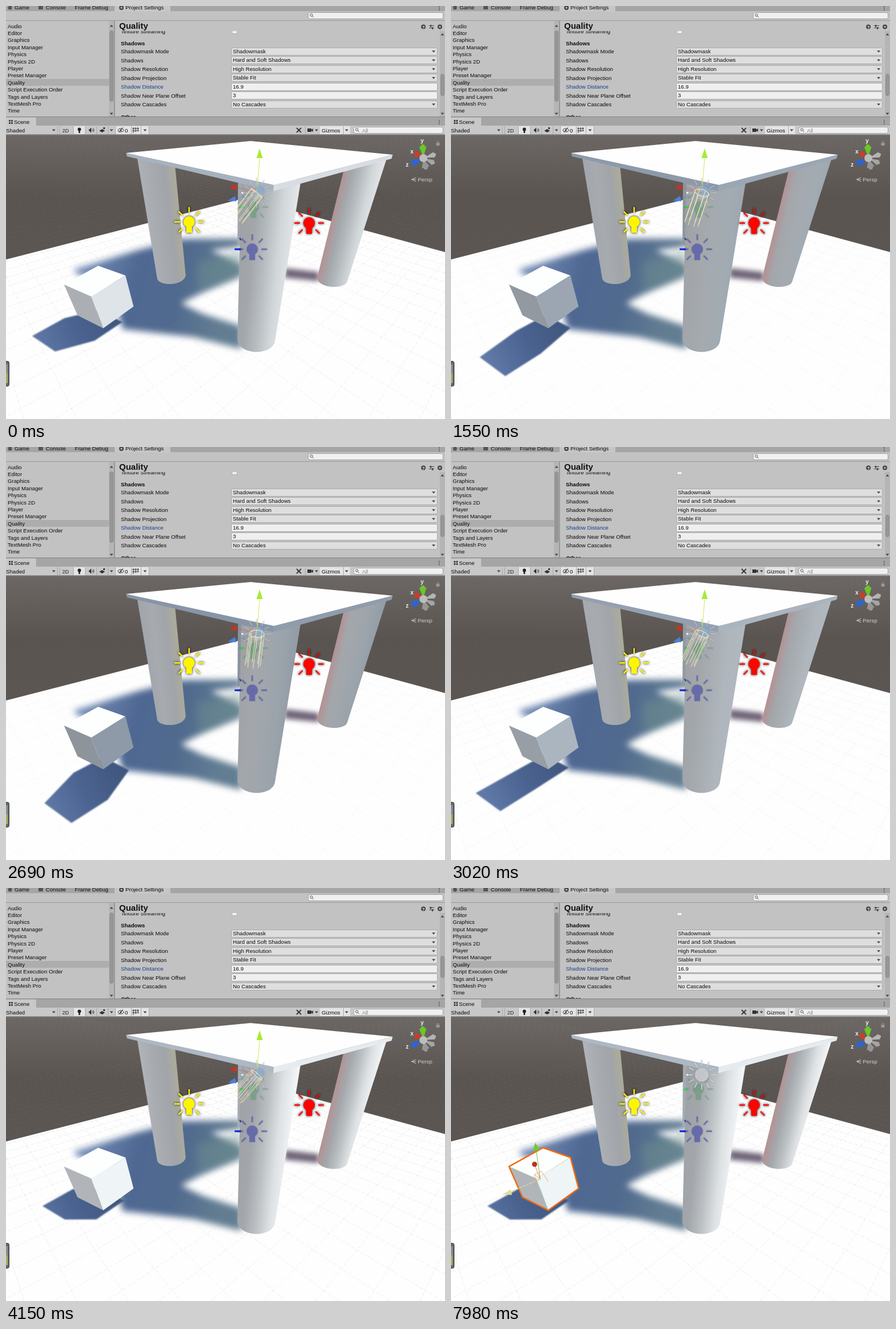
These frames come from a looping animation (772 by 725 pixels, 8000 ms). An HTML page with a canvas:

```html
<!DOCTYPE html>
<html lang="en">
<head>
<meta charset="utf-8">
<title>Shadow distance</title>
<style>
html, body { margin: 0; width: 100%; height: 100%; overflow: hidden; background: #c2c2c2; }
canvas { display: block; }
</style>
</head>
<body>
<canvas id="stage" width="772" height="725"></canvas>
<script>
const ctx = document.getElementById('stage').getContext('2d');
const LOOP = 8000;

// Camera space: x right, y down, z forward
const FOCAL = 481, CENTER = [386, 475];
const RIGHT = [1, 0, 0], DOWN = [0, .856, .517], FORWARD = [0, -.517, .856];
const FLOOR_DEPTH = 385, LIGHT_POS = [55, -147, FOCAL];

const dot = (a, b) => a[0] * b[0] + a[1] * b[1] + a[2] * b[2];
const add = (a, b, k = 1) => a.map((v, i) => v + k * b[i]);
const cross = (a, b) => [a[1] * b[2] - a[2] * b[1], a[2] * b[0] - a[0] * b[2], a[0] * b[1] - a[1] * b[0]];
const unit = a => a.map(v => v / Math.sqrt(dot(a, a)));
const project = ([x, y, z]) => [CENTER[0] + FOCAL * x / z, CENTER[1] + FOCAL * y / z];

// Cube corners: bits 1, 2 and 4 step right, left and down from the near top corner
const cubeEdges = [[43.7, -37.2, 44.6], [-69, -20, 35.6], [-.5, 64.8, 48.1]];
const corners = Array.from({ length: 8 }, (_, bits) => cubeEdges.reduce(
  (p, edge, i) => add(p, edge, bits >> i & 1), [-236, 35, FOCAL]));
const cubePoints = corners.map(project);

// The light turns about the vertical axis: [ms, degrees]
const turns = [[500, 18], [1140, 41.5], [1910, 79], [2240, 80.5], [2510, 80.5],
  [2690, 78], [3460, 12], [4150, -6.5]];

function lightAngle(t) {
  const next = turns.findIndex(([time]) => t < time);
  if (next < 0) return turns[turns.length - 1][1];
  if (next === 0) return turns[0][1];
  const [t0, a] = turns[next - 1], [t1, b] = turns[next];
  return a + (b - a) * (t - t0) / (t1 - t0);
}

function lightDirection(degrees) {
  const a = degrees * Math.PI / 180, slant = .8 + .0014 * degrees;
  return add(add(DOWN, RIGHT, -slant * Math.cos(a)), FORWARD, -slant * Math.sin(a));
}

function hull(points) {
  const sorted = [...points].sort((p, q) => p[0] - q[0] || p[1] - q[1]);
  const half = list => {
    const out = [];
    for (const p of list) {
      while (out.length > 1) {
        const [a, b] = out.slice(-2);
        if ((b[0] - a[0]) * (p[1] - a[1]) - (b[1] - a[1]) * (p[0] - a[0]) > 0) break;
        out.pop();
      }
      out.push(p);
    }
    return out.slice(0, -1);
  };
  return [...half(sorted), ...half(sorted.reverse())].flat();
}

const castShadow = light => hull(corners.map(p => project(add(p, light, FLOOR_DEPTH - dot(p, DOWN)))));

function mix(dark, bright, k) {
  const part = (hex, n) => parseInt(hex.substr(1 + 2 * n, 2), 16);
  return `rgb(${[0, 1, 2].map(n => Math.round(part(dark, n) + (part(bright, n) - part(dark, n)) * k))})`;
}

function gradient(x0, y0, x1, y1, ...colors) {
  const g = ctx.createLinearGradient(x0, y0, x1, y1);
  colors.forEach((c, i) => g.addColorStop(i / (colors.length - 1), c));
  return g;
}

function path(points, close = true) {
  ctx.beginPath();
  for (let i = 0; i < points.length; i += 2) ctx.lineTo(points[i], points[i + 1]);
  if (close) ctx.closePath();
}

function poly(points, fill, blur = 0) {
  path(points);
  if (blur) ctx.filter = `blur(${blur}px)`;
  ctx.fillStyle = fill;
  ctx.fill();
  ctx.filter = 'none';
}

function stroke(color, width = 1) {
  ctx.strokeStyle = color;
  ctx.lineWidth = width;
  ctx.stroke();
}

function line(points, color, width) {
  path(points, false);
  stroke(color, width);
}

function disc(x, y, r, fill) {
  ctx.beginPath();
  ctx.arc(x, y, r, 0, 7);
  ctx.fillStyle = fill;
  ctx.fill();
}

function ring(x, y, r, color, from = 0, to = 7) {
  ctx.beginPath();
  ctx.arc(x, y, r, from, to);
  stroke(color);
}

function cone(x, y, tipX, tipY, r, color) {
  const dx = tipX - x, dy = tipY - y, k = r / Math.hypot(dx, dy);
  poly([x - dy * k, y + dx * k, tipX, tipY, x + dy * k, y - dx * k], color);
}

function rect(x, y, w, h, fill) {
  ctx.fillStyle = fill;
  ctx.fillRect(x, y, w, h);
}

function box(x, y, w, h, fill, border, r = 2) {
  ctx.beginPath();
  ctx.roundRect(x + .5, y + .5, w - 1, h - 1, r);
  ctx.fillStyle = fill;
  ctx.fill();
  stroke(border);
}

function text(s, x, y, color = '#0b0b0b', size = 9.65, weight = '') {
  ctx.font = `${weight} ${size}px "Liberation Sans", Arial, sans-serif`;
  ctx.fillStyle = color;
  ctx.fillText(s, x, y);
}

const arrow = (x, y, up = 1) => cone(x, y - 1.5 * up, x, y + 2 * up, 3, '#444');

function searchField(x, y, w) {
  box(x, y, w, 12, '#f0f0f0', '#a0a0a0', 3);
  ring(x + 6, y + 5, 2.2, '#555');
  line([x + 7.6, y + 6.6, x + 10, y + 9], '#555');
}

function menuDots(y) {
  for (let i = -1; i < 2; i++) rect(761, y + i * 3, 1.5, 1.5, '#444');
}

function scrollbar(x, y, h, thumbY, thumbH) {
  rect(x, y, 9, h, '#b5b5b5');
  box(x + 1, thumbY, 7, thumbH, '#969696', '#8c8c8c', 3);
  arrow(x + 4.5, 189);
}

function gear(x, y) {
  disc(x, y, 4, '#444');
  disc(x, y, 1.6, '#c6c6c6');
}

function clipped(x, y, w, h, draw) {
  ctx.save();
  ctx.beginPath();
  ctx.rect(x, y, w, h);
  ctx.clip();
  draw();
  ctx.restore();
}

function settingsPanel(t) {
  rect(0, 0, 772, 226, '#c2c2c2');
  rect(0, 0, 772, 9, '#a5a5a5');
  rect(191, 0, 98, 10, '#c6c6c6');
  disc(7, 3, 3.5, '#555');
  text('Game', 15, 6);
  rect(57, 0, 8, 6, '#555');
  text('Console', 70, 6);
  text('Frame Debug', 121, 6);
  gear(203, 3);
  text('Project Settings', 210, 6);
  menuDots(3);
  rect(0, 25, 772, 1, '#999');
  searchField(531, 11, 238);

  clipped(0, 26, 181, 168, () => {
    rect(0, 128, 181, 12, '#adadad');
    'Audio,Editor,Graphics,Input Manager,Physics,Physics 2D,Player,Preset Manager,Quality,Script Execution Order,Tags and Layers,TextMesh Pro,Time,VFX'
      .split(',').forEach((s, i) => text(s, 3, 38.6 + i * 12.4));
  });
  scrollbar(181, 26, 168, 43, 125);
  arrow(185.5, 35, -1);
  rect(190, 26, 1.5, 168, '#8b8b8b');

  text('Quality', 199, 40, '#111', 15, 'bold');
  disc(734, 36.5, 4, '#444');
  text('?', 732, 39.5, '#fff', 7, 'bold');
  [34, 38].forEach((y, i) => {
    line([744, y + .5, 753, y + .5], '#444');
    rect(746 + 3 * i, y - 1, 2, 4, '#444');
  });
  gear(763, 36.5);

  clipped(192, 44, 572, 150, () => {
    text('Texture Streaming', 202, 47.5);
    box(397, 38, 10, 11, t >= 6120 && t < 6160 ? '#fff' : '#f0f0f0', '#aaa');
    text('Shadows', 202, 69, '#0b0b0b', 9.65, 'bold');
    [['Shadowmask Mode', 'Shadowmask'], ['Shadows', 'Hard and Soft Shadows'],
      ['Shadow Resolution', 'High Resolution'], ['Shadow Projection', 'Stable Fit'],
      ['Shadow Distance', '16.9'], ['Shadow Near Plane Offset', '3'],
      ['Shadow Cascades', 'No Cascades']].forEach(([label, value], i) => {
      const y = 79.7 + i * 15.5, input = i === 4 || i === 5;
      const hover = i === 5 && t >= 7340 && t < 7380;
      text(label, 202, y + 3.7, i === 4 ? '#16408c' : undefined);
      box(396, Math.round(y - 7), 363, 14, input ? '#efefef' : '#dedede', hover ? '#777' : '#aaa');
      text(value, 399, y + 3.2);
      if (!input) arrow(752, y);
    });
    text('Other', 202, 198, '#0b0b0b', 9.65, 'bold');
  });
  scrollbar(763, 44, 150, 119, 39);
  arrow(767.5, 50, -1);
}

function sceneToolbar() {
  rect(0, 194, 772, 1.5, '#858585');
  rect(0, 195.5, 772, 15, '#a5a5a5');
  rect(0, 195.5, 53, 15, '#c8c8c8');
  for (const x of [5, 9]) for (const y of [200, 204]) rect(x, y, 3, 3, '#444');
  text('Scene', 14, 207);
  menuDots(203);
  rect(0, 210, 772, 16, '#c8c8c8');
  rect(0, 225, 772, 1.5, '#8d8d8d');
  for (const [x, w] of [[119, 20], [193, 27], [221, 30], [552, 53]]) rect(x, 211, w, 14, '#e4e4e4');
  for (const x of [90, 94, 118, 139, 159, 179, 192, 220, 237, 251, 526, 593]) rect(x, 211, 1, 14, '#a8a8a8');
  for (const x of [84, 185.5, 244.5, 546, 599]) arrow(x, 218);
  text('Shaded', 0, 221.5);
  text('2D', 99, 221.5, '#222', 9);
  disc(129, 216.5, 3, '#222');
  rect(127.7, 218, 2.6, 5, '#222');
  cone(150, 218, 145, 218, 4.5, '#333');
  for (const r of [2, 4]) ring(150.5, 218, r, '#333', -1, 1);
  poly([164, 219, 169, 216, 174, 219, 169, 222], '#333');
  rect(171, 213, 3, 3, '#333');
  ctx.beginPath();
  ctx.ellipse(202, 218, 5, 3, 0, 0, 7);
  stroke('#333');
  disc(202, 218, 1.5, '#333');
  line([198, 222, 206, 213], '#333');
  text('0', 209, 221.5);
  for (const k of [0, 4, 8]) line([224 + k, 213, 224 + k, 223 - k / 2], '#333');
  for (const y of [215, 219]) line([222, y, 234, y], '#333');
  line([511, 214, 519, 222], '#333', 1.8);
  line([519, 214, 511, 222], '#333', 1.8);
  rect(530, 215, 7, 6, '#333');
  cone(540, 218, 536, 218, 3, '#333');
  text('Gizmos', 555, 221.5);
  searchField(611, 212, 158);
  text('All', 626, 221.5, '#8a8a8a');
}

function grid(alpha) {
  ctx.setLineDash([7, 3]);
  for (let x = -2400; x < 3200; x += 92) {
    line([984, 185, x, 725], `rgba(125,130,135,${alpha})`, .7);
    line([-141, 185, x + 40, 725], `rgba(125,130,135,${alpha})`, .7);
  }
  ctx.setLineDash([]);
}

function ground(light, k) {
  rect(0, 226, 772, 499, gradient(0, 226, 0, 445, '#6c6764', '#5a5450', '#5c5653'));
  ctx.save();
  path([0, 445, 421, 337, 772, 432, 772, 725, 0, 725]);
  ctx.fillStyle = '#fefefe';
  ctx.fill();
  ctx.clip();
  poly([118, 463, 230, 429, 310, 409, 414, 408, 414, 422, 360, 429, 414, 455, 414, 473, 350, 500,
    308, 522, 345, 540, 414, 562, 414, 602, 330, 581, 205, 567, 180, 480, 130, 473],
    gradient(150, 440, 390, 500, '#6f89b2', '#4f6893', '#506a8e', '#627d92'), 6);
  poly([335, 450, 414, 430, 414, 474, 340, 500], 'rgba(108,142,142,.5)', 7);
  poly([490, 460, 550, 467, 550, 483, 490, 477], '#706478', 4);
  poly(castShadow(light), gradient(60, 610, 190, 545, '#5f78a6', '#4b6390', '#40577f'), 1.3);
  ctx.restore();
  grid(.08 + .12 * k);
}

function pillar(points, fill, bottom) {
  const [x0, y0, x1, y1, x2, y2, x3, y3] = points;
  ctx.beginPath();
  ctx.moveTo(x0, y0);
  ctx.lineTo(x1, y1);
  ctx.lineTo(x2, y2);
  ctx.bezierCurveTo(x2 - 4, bottom + 4, x3 + 4, bottom + 4, x3, y3);
  ctx.fillStyle = fill;
  ctx.fill();
}

function table(k) {
  const shade = ['#9fa2a6', '#a3a7ab', mix('#a0a6ac', '#bbc0c3', k),
    mix('#9aa2aa', '#dde1e3', k), mix('#929ca6', '#f2f4f5', k)];
  poly([408, 305, 416, 305, 416, 420, 407, 420], mix('#89929b', '#a4abb1', k));
  pillar([230, 262, 297, 278, 316, 473, 266, 479],
    gradient(246, 390, 312, 382, mix('#a0a5ab', '#b0b4b8', k), '#a7abb0', '#a1a5a9', '#aeac98'), 488);
  pillar([594, 288, 670, 266, 600, 484, 547, 478],
    gradient(569, 380, 637, 396, '#b58f91', ...shade.slice(1)), 493);
  pillar([414, 304, 519, 304, 473, 588, 407, 586], gradient(409, 440, 500, 449, ...shade), 610);
  poly([211, 258, 471, 314, 470, 325, 213, 264], mix('#8795a7', '#adb8c4', k));
  poly([471, 314, 680, 261, 678, 268, 470, 325], mix('#8e9baa', '#e6ebef', k));
  poly([211, 258, 430, 237, 680, 261, 471, 314], '#fefefe');
}

function cube(k) {
  const face = (ids, color) => poly(ids.flatMap(i => cubePoints[i]), color);
  face([0, 1, 3, 2], '#fdfefe');
  face([0, 2, 6, 4], mix('#8d949c', '#b1b5b9', k));
  face([0, 1, 5, 4], mix('#8d99a7', '#eff4f6', k));
}

function lamp(x, y, color, { alpha = 1, sun = false } = {}) {
  ctx.save();
  ctx.globalAlpha = alpha;
  ctx.shadowColor = alpha < 1 ? 'rgba(40,40,60,.4)' : '#000';
  ctx.shadowBlur = alpha < 1 ? 2 : 4;
  ctx.lineCap = 'round';
  const count = sun ? 12 : 8;
  for (let i = 0; i < count; i++) {
    const a = i / count * 2 * Math.PI, c = Math.cos(a), s = Math.sin(a);
    if (!sun && i === 2) continue;
    line([x + 17 * c, y + 17 * s, x + 25 * c, y + 25 * s], color, 2.4);
  }
  ctx.beginPath();
  ctx.arc(x, y, sun ? 12 : 10, 0, 7);
  if (!sun) ctx.rect(x - 5, y + 8, 10, 11);
  ctx.fillStyle = color;
  ctx.fill();
  ctx.restore();
}

function lightHandle(light) {
  const [x, y] = project(LIGHT_POS);
  line([x, y, 446, 268], '#cfe85c');
  cone(446, 267, 446, 250, 5.5, '#a5ec35');
  line([x, y, 405, 318], 'rgba(220,70,50,.5)');
  cone(405, 318, 393, 318, 5, '#cf3020');
  line([x, y, 404, 338], 'rgba(70,120,220,.5)');
  cone(404, 338, 390, 342, 5, '#4b80d8');
  disc(446, 324, 9, 'rgba(110,160,215,.45)');
  line([430, 328, 430, 320, 440, 320], 'rgba(240,80,60,.7)');

  const side = unit(cross(light, DOWN)), up = unit(cross(light, side));
  const rim = [];
  for (let i = 0; i < 32; i++) {
    const a = i * Math.PI / 16;
    const p = add(add(LIGHT_POS, side, 13 * Math.cos(a)), up, 13 * Math.sin(a));
    rim.push(...project(p));
    if (i % 4 === 0) line([...project(p), ...project(add(p, light, 44))], 'rgba(250,248,185,.85)');
  }
  path(rim);
  stroke('#fbf9c4');
}

function cubeHandle(t) {
  ctx.lineJoin = 'round';
  path(hull(cubePoints));
  stroke('#f26a12', 2.5);
  for (const i of [1, 2, 4]) line([...cubePoints[0], ...cubePoints[i]], 'rgba(150,225,150,.5)');
  const green = t >= 7610 && t < 7710 ? '#eee05a' : '#72c82c';
  const z = t >= 7980 ? '#e5dc94' : '#4580dc';
  line([157, 511, 150, 462], green);
  cone(150.5, 461, 148, 447, 6, green);
  line([157, 511, 147, 486], '#e28878');
  disc(147, 485, 4.5, '#bd3022');
  line([157, 511, 105, 533], z);
  cone(106, 534, 91, 538, 5, z);
  line([171, 515, 159, 497, 147, 503, 148, 515, 157, 511, 147, 503], '#f0a08c');
}

function orientation() {
  const x = 734, y = 267;
  const axis = (dx, dy, r, color) => {
    cone(x + dx, y + dy, x + dx * .1, y + dy * .1, r, color);
    disc(x + dx, y + dy, r * .6, color);
  };
  axis(4, 16, 7, '#969696');
  axis(19, -6, 5, '#b4b4b4');
  axis(17, 8, 5, '#a5a5a5');
  axis(-13, -8, 5, '#d63a22');
  axis(-18, 9, 6, '#2d64d4');
  axis(-1, -20, 6.5, '#6cc627');
  disc(x, y, 7, '#bdbdbd');
  [['y', 729, 240], ['x', 711, 259], ['z', 703, 282]].forEach(([s, lx, ly]) => text(s, lx, ly, '#eee', 10, 'bold'));
  line([721, 301, 713, 304.5, 721, 308], '#c8c6c4');
  line([721, 304.5, 714, 304.5], '#c8c6c4');
  text('Persp', 724, 308, '#d0cecc', 9.8);
  rect(756.5, 240, 6, 5, '#9c9896');
  ring(759.5, 239.5, 2, '#9c9896', Math.PI, 0);
}

function scene(t) {
  const angle = lightAngle(t), light = lightDirection(angle);
  const k = Math.cos((angle + 6.5) * Math.PI / 180) ** 2;
  const cubeSelected = t >= 7120;
  ground(light, k);
  table(k);
  cube(k);
  lamp(322, 379, '#fdf500');
  lamp(533, 381, '#fb0500');
  lamp(435, 353, '#58b070', { alpha: .35 });
  lamp(433, 427, '#6467b0', { alpha: .85 });
  line([402, 427, 413, 427], '#1020d8', 3);
  line([411, 407, 413, 411], '#223090', 2);
  disc(414, 353.5, 2, '#14e02a');
  lamp(441, 328, '#d9dde0', { alpha: cubeSelected ? .75 : .45, sun: true });
  disc(415.5, 328, 1.8, '#f4f4f4');
  if (cubeSelected) cubeHandle(t);
  else lightHandle(light);
  orientation();
  box(-5, 623, 11, 45, '#62676b', '#3d4144', 3);
  rect(0, 629, 3, 16, '#8b9296');
  rect(0, 645, 3, 17, '#a6b05c');
}

function frame(now) {
  const t = now % LOOP;
  clipped(0, 226, 772, 499, () => scene(t));
  settingsPanel(t);
  sceneToolbar();
  requestAnimationFrame(frame);
}
requestAnimationFrame(frame);
</script>
</body>
</html>
```
